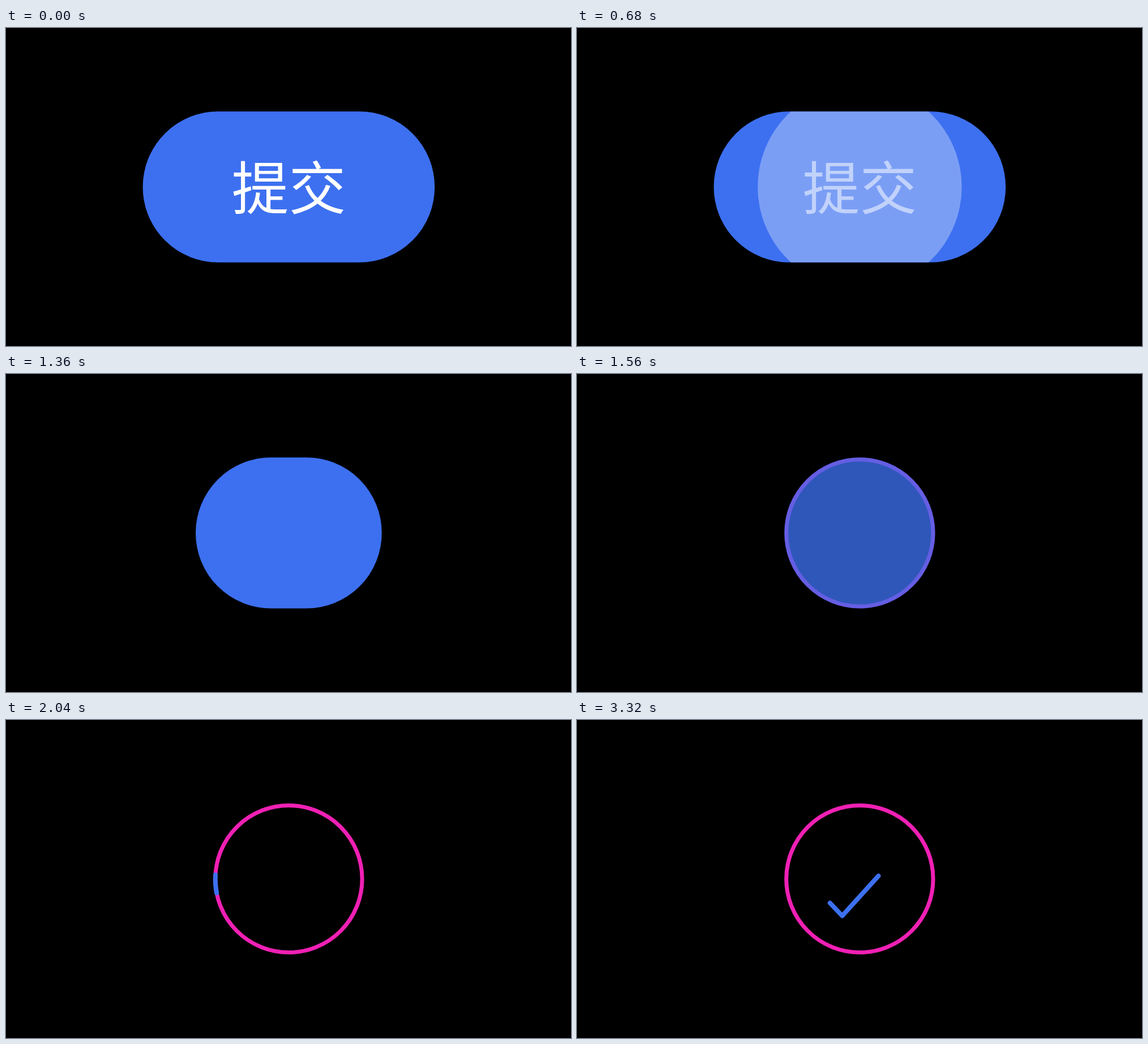
Write an HTML page that moves like this. It is 998 px wide and 561 px high and loops after 3840 ms.

```html
<!DOCTYPE html>
<html lang="zh-CN">
<head>
<meta charset="utf-8">
<style>
  html, body { margin: 0; width: 100%; height: 100%; overflow: hidden; background: #000; }
  svg { display: block; width: 998px; height: 561px; }
  text { font: 400 101px "Noto Sans CJK SC", "Noto Sans CJK", sans-serif; }
</style>
</head>
<body>
<svg viewBox="0 0 998 561">
  <clipPath id="clip"><rect x="241.6" y="147.2" width="515.6" height="266.4" rx="133.2"/></clipPath>
  <rect id="button" y="150.7" height="259.4" rx="129.7" stroke-width="7" fill="#3d70f0"/>
  <text id="label" x="499.4" y="319.5" text-anchor="middle" fill="#fff">提交</text>
  <circle id="ripple" cx="499.4" cy="280.4" fill="#fff" clip-path="url(#clip)"/>
  <path id="trace" fill="none" stroke="#3d70f0" stroke-width="8" stroke-linecap="round" stroke-linejoin="round"/>
</svg>
<script>
const LOOP = 3840, STEP = 40, CX = 499.4, CY = 280.4, R = 129.7;
const BLUE = [61, 112, 240], PINK = [240, 32, 180];
const [button, label, ripple, trace] =
  ['button', 'label', 'ripple', 'trace'].map(id => document.getElementById(id));

const progress = (t, from, to) => Math.min(1, Math.max(0, (t - from) / (to - from)));
const mix = (a, b, p) => a + (b - a) * p;

// Cubic Bezier easing with handles (x1, 0) and (x2, 1)
function ease(x, x1, x2) {
  let lo = 0, hi = 1;
  for (let i = 0; i < 30; i++) {
    const s = (lo + hi) / 2, r = 1 - s;
    if (3 * x1 * s * r * r + 3 * x2 * s * s * r + s * s * s < x) lo = s; else hi = s;
  }
  return lo * lo * (3 - 2 * lo);
}

// One counter-clockwise turn, then straight off into the check mark
const dx = R * Math.cos(Math.PI / 12), dy = R * Math.sin(Math.PI / 12);
const start = `${CX - dx} ${CY - dy}`;
trace.setAttribute('d', `M${start} A${R} ${R} 0 0 0 ${CX + dx} ${CY + dy}
  A${R} ${R} 0 0 0 ${start} L468.5 345.5 L532.5 275`);
const headEnd = trace.getTotalLength(), tailEnd = headEnd - 127.2;

function draw(t) {
  const width = mix(508.6, 2 * R, progress(t, 1000, 1480));
  button.setAttribute('x', CX - width / 2);
  button.setAttribute('width', width);

  const toRing = progress(t, 1480, 1840);
  button.setAttribute('fill-opacity', 1 - toRing);
  button.setAttribute('stroke', `rgb(${BLUE.map((c, i) => Math.round(mix(c, PINK[i], toRing)))})`);

  label.setAttribute('opacity', 1 - progress(t, 400, 1000));
  const spread = progress(t, 0, 1000);
  ripple.setAttribute('r', 265 * spread);
  ripple.setAttribute('opacity', 1 - spread);

  const run = progress(t, 1840, 3320);
  const head = headEnd * ease(run, 0.35, 0.4), tail = tailEnd * ease(run, 0.5, 0.4);
  trace.setAttribute('visibility', run > 0 ? 'visible' : 'hidden');
  trace.setAttribute('stroke-dasharray', `${Math.max(0.01, head - tail)} 3000`);
  trace.setAttribute('stroke-dashoffset', -tail);
}

const origin = performance.now();
function tick() {
  const t = (performance.now() - origin) % LOOP;
  draw(Math.floor(t / STEP) * STEP);
  requestAnimationFrame(tick);
}
tick();
</script>
</body>
</html>
```
